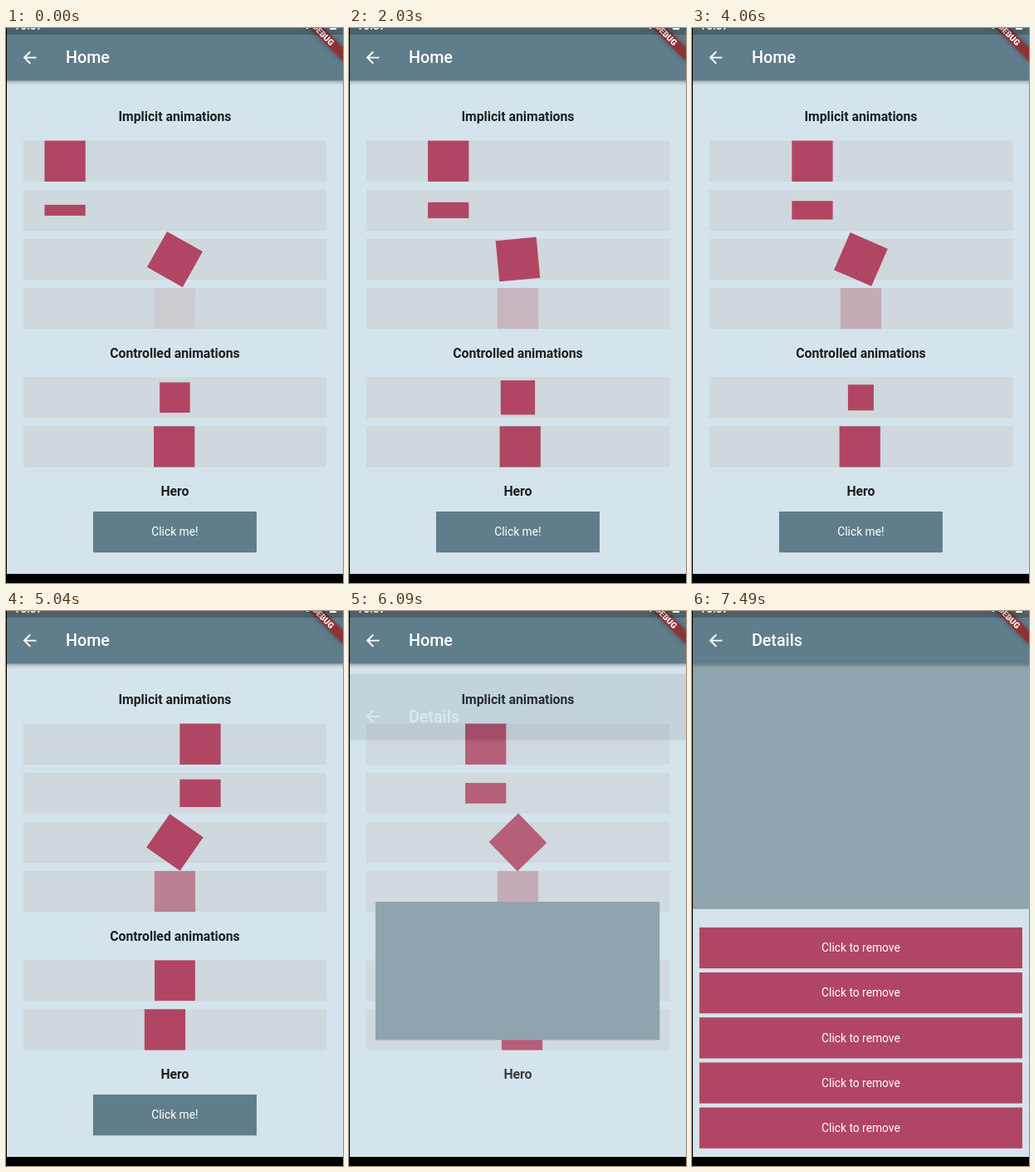
Animation, 406 px wide and 668 px high, one loop 8000 ms. Source, as an HTML page with a canvas:

```html
<!DOCTYPE html>
<html lang="en">
<head>
<meta charset="utf-8">
<title>Animations demo</title>
<style>
  html, body { margin: 0; width: 100%; height: 100%; overflow: hidden; background: #000; }
  canvas { display: block; }
</style>
</head>
<body>
<canvas id="stage" width="406" height="668"></canvas>
<script>
const LOOP = 8000, STEP = 70, LAST = 7490;
const SCALE = 0.985, LEFT = 1, TOP = -15.6;   // logical units to pixels
const W = 411, H = 683, MID = W / 2, BAR = 80;
const PAGE = '#d5e4ec', PANEL = '#cfd8dc', RED = '#b04663';
const SLATE = '#607d8b', SLATE_LIGHT = '#90a4ae', INK = 'rgba(0,0,0,.87)';
const BUTTON = { x: 105.5, y: 606.7, w: 200, h: 50 };
const HERO = { x: 0, y: BAR, w: W, h: 300 };
const ROWS = [153.5, 213.5, 273.5, 333.5, 442.4, 502.4];
const FLIPS = [-998, 60, 1137, 2170, 3225, 4272, 5302];
const PUSH = 5985, PUSH_TIME = 315;
const BACK = new Path2D('M20 11H7.83l5.59-5.59L12 4l-8 8 8 8 1.41-1.41L7.83 13H20v-2z');

const stage = document.getElementById('stage').getContext('2d');
const layer = Object.assign(document.createElement('canvas'), { width: 406, height: 668 }).getContext('2d');
let g = stage;

const clamp = v => Math.max(0, Math.min(1, v));
const lerp = (a, b, t) => a + (b - a) * t;

// Cubic bezier (x1, 0, x2, 1)
function bezier(x1, x2, u) {
  if (u <= 0 || u >= 1) return clamp(u);
  let lo = 0, hi = 1, s = 0.5;
  for (let i = 0; i < 24; i++) {
    s = (lo + hi) / 2;
    const x = 3 * x1 * s * (1 - s) ** 2 + 3 * x2 * s * s * (1 - s) + s ** 3;
    if (x < u) lo = s; else hi = s;
  }
  return s * s * (3 - 2 * s);
}
const easeIn = u => bezier(0.42, 1, u);
const fastOutSlowIn = u => bezier(0.4, 0.2, u);
const elasticIn = u => -(2 ** (10 * (u - 1))) * Math.sin((u - 1.1) * 5 * Math.PI);

// Point on a circular arc that arrives vertically
function arc(a, b, t) {
  const dx = a.x - b.x, dy = a.y - b.y;
  const d = Math.hypot(dx, dy), r = d * d / Math.abs(dx) / 2;
  const angle = 2 * Math.asin(d / (2 * r)) * (1 - t);
  return {
    x: b.x + Math.sign(dx) * r * (1 - Math.cos(angle)),
    y: b.y + Math.sign(dy) * r * Math.sin(angle)
  };
}

function useUnits(ctx, dy = 0) {
  g = ctx;
  g.setTransform(SCALE, 0, 0, SCALE, LEFT, TOP + dy * SCALE);
}
function rect(x, y, w, h, color) {
  g.fillStyle = color;
  g.fillRect(x, y, w, h);
}
function box(cx, cy, w, h) {
  rect(cx - w / 2, cy - h / 2, w, h, RED);
}
function text(str, x, cy, size, weight, color, align = 'center') {
  g.font = `${weight} ${size}px Roboto, sans-serif`;
  g.textAlign = align;
  g.fillStyle = color;
  g.fillText(str, x, cy + size * 0.342);
}

function appBar(title) {
  g.save();
  g.shadowColor = 'rgba(0,0,0,.4)';
  g.shadowBlur = 5;
  g.shadowOffsetY = 2;
  rect(-8, 0, W + 16, BAR, SLATE);
  g.restore();
  g.save();
  g.translate(16, 40);
  g.fillStyle = '#fff';
  g.fill(BACK);
  g.restore();
  text(title, 72, 52, 20, 500, '#fff', 'left');
}

function swing(t) {
  let i = 0;
  while (i + 1 < FLIPS.length && FLIPS[i + 1] <= t) i++;
  const e = easeIn(clamp((t - FLIPS[i]) / 1050));
  return i % 2 ? e : 1 - e;
}

function home(t) {
  const p = swing(t);
  const v = 1 - Math.abs((t + 997) % 4200 - 2100) / 2100;
  const [y1, y2, y3, y4, y5, y6] = ROWS.map(y => y + 25);
  const x = lerp(45, 366, p);

  rect(0, 0, W, H, PAGE);
  ROWS.forEach(y => rect(20, y, 371, 50, PANEL));
  box(x, y1, 50, 50);
  box(x, y2, 50, lerp(10, 50, p));
  g.save();
  g.translate(MID, y3);
  g.rotate(p * 2 * Math.PI);
  box(0, 0, 50, 50);
  g.restore();
  g.globalAlpha = p;
  box(MID, y4, 50, 50);
  g.globalAlpha = 1;
  const size = 50 * fastOutSlowIn(v);
  box(MID, y5, size, size);
  box(MID + 75 * elasticIn(v), y6, 50, 50);

  text('Implicit animations', MID, 124, 16, 'bold', INK);
  text('Controlled animations', MID, 413, 16, 'bold', INK);
  text('Hero', MID, 582, 16, 'bold', INK);
  if (t < PUSH) {
    rect(BUTTON.x, BUTTON.y, BUTTON.w, BUTTON.h, SLATE);
    text('Click me!', MID, BUTTON.y + 25, 14, 400, '#fff');
  }
  appBar('Home');
}

function details(t, landed) {
  rect(0, 0, W, H, PAGE);
  if (landed) rect(HERO.x, HERO.y, HERO.w, HERO.h, SLATE_LIGHT);
  for (let i = 0; i < 5; i++) {
    const u = clamp((t - 6320 - 210 * i) / 315);
    if (!u) continue;
    const x = 8 - W * (1 - u), y = 402.5 + 55 * i;
    rect(x, y, 395, 50, RED);
    text('Click to remove', x + 197.5, y + 25, 14, 400, '#fff');
  }
  appBar('Details');
}

function flight(k) {
  const a = arc(BUTTON, HERO, k);
  const corner = r => ({ x: r.x + r.w, y: r.y + r.h });
  const b = arc(corner(BUTTON), corner(HERO), k);
  rect(a.x, a.y, b.x - a.x, b.y - a.y, SLATE_LIGHT);
}

function banner() {
  g.save();
  g.translate(W, 0);
  g.rotate(Math.PI / 4);
  g.save();
  g.shadowColor = 'rgba(0,0,0,.5)';
  g.shadowBlur = 6;
  rect(-40, 28, 80, 12, 'rgba(183,28,28,.63)');
  g.restore();
  text('DEBUG', 0, 34, 10.2, 900, '#fff');
  g.restore();
}

function chrome() {
  banner();
  rect(0, 0, W, 24, 'rgba(0,0,0,.22)');
  g.setTransform(1, 0, 0, 1, 0, 0);
  g.font = '500 14px Roboto, sans-serif';
  g.textAlign = 'left';
  g.fillStyle = '#fff';
  g.fillText('16:37', 9, 1.5);
  rect(362, 0, 2, 1, '#fff');
  rect(390, 0, 8, 2, '#fff');
  rect(0, 0, 1, 668, '#000');
  rect(0, 657, 406, 11, '#000');
}

function draw(t) {
  const v = clamp((t - PUSH) / PUSH_TIME);
  const k = fastOutSlowIn(v);
  useUnits(stage);
  if (v < 1) home(t);
  if (v > 0) {
    layer.setTransform(1, 0, 0, 1, 0, 0);
    layer.clearRect(0, 0, 406, 668);
    useUnits(layer, H / 4 * (1 - k));
    details(t, v === 1);
    stage.setTransform(1, 0, 0, 1, 0, 0);
    stage.globalAlpha = easeIn(v);
    stage.drawImage(layer.canvas, 0, 0);
    stage.globalAlpha = 1;
    useUnits(stage);
    if (v < 1) flight(k);
  }
  chrome();
}

const start = performance.now();
function tick() {
  const t = (performance.now() - start) % LOOP;
  draw(Math.min(LAST, Math.floor(t / STEP) * STEP));
  requestAnimationFrame(tick);
}
tick();
</script>
</body>
</html>
```
